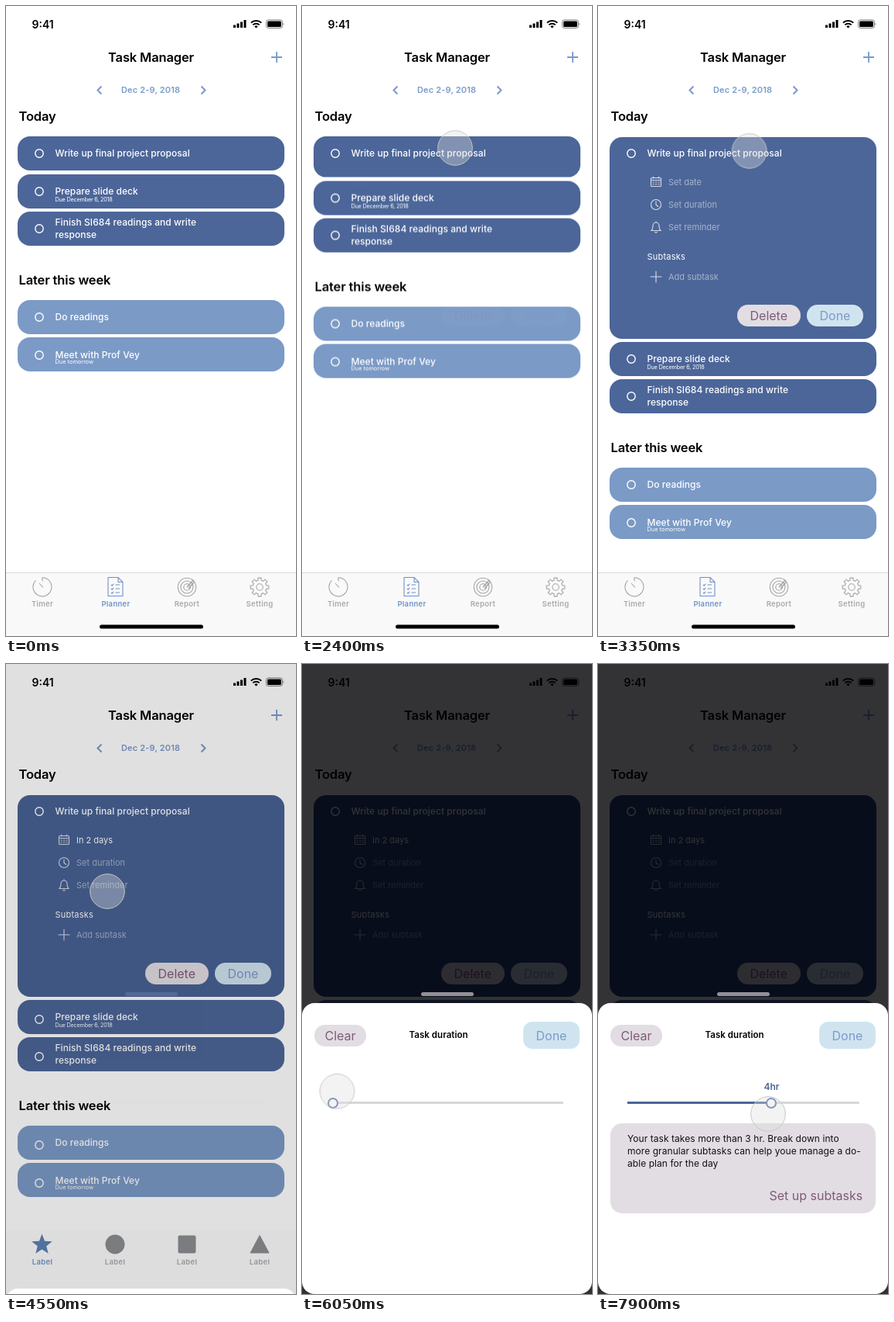
Animation of 375x812 px, one loop 8 s. Source, as an HTML page:

```html
<!DOCTYPE html>
<html lang="en">
<head>
<meta charset="utf-8">
<title>Task planner</title>
<style>
html, body { margin: 0; width: 100%; height: 100%; overflow: hidden; background: #fff; }
svg { display: block; width: 375px; height: 812px; }
text { font: 500 12px Inter, "Liberation Sans", sans-serif; fill: #fff; }
.line { fill: none; stroke: #fff; stroke-width: 1.1; stroke-linecap: round; stroke-linejoin: round; }
.title { font-size: 16.5px; font-weight: 600; letter-spacing: -.14px; fill: #000; }
.title.small { font-size: 11.5px; letter-spacing: .05px; }
.clock { font-size: 14px; font-weight: 600; fill: #000; }
.week { font-size: 11px; font-weight: 600; letter-spacing: .15px; fill: #7b9acb; }
.task { letter-spacing: .05px; }
.due { font-size: 7.3px; font-weight: 400; letter-spacing: -.23px; }
.due.loose { letter-spacing: .05px; }
.field { font-size: 11px; font-weight: 400; }
.field.wide { letter-spacing: .22px; }
.dim { fill: rgba(255, 255, 255, .5); }
.button { font-size: 16px; font-weight: 400; }
.tabs text { font-size: 9.5px; font-weight: 600; letter-spacing: .3px; fill: #a9a9ad; text-anchor: middle; }
.tabs .on { fill: #6f92cb; }
.dark { fill: #4c6699; }
.light { fill: #7b9ac6; }
.ring { fill: none; stroke: #fff; stroke-width: 1.4; }
.pink { fill: #e2dde3; }
.sky { fill: #d0e4f0; }
.plum { fill: #7f5b78; }
.blue { fill: #7d9acb; }
.body { font-weight: 400; letter-spacing: .06px; fill: #111; }
.value { font-weight: 600; fill: #4c6699; text-anchor: middle; }

.grow, .push, .detail, .before, .after, .drop, .fade, .sheet, .knob, .fill, .reveal, .touch, .touch g {
  animation: 8s linear infinite;
}
.grow { animation-name: grow, darken; }
.push { animation-name: push; }
.detail { animation-name: detail; }
.before { animation-name: before; animation-timing-function: step-end; }
.after { animation-name: after; animation-timing-function: step-end; }
.drop { animation-name: drop; animation-timing-function: step-end; }
.fade { animation-name: fade; }
.sheet { animation-name: sheet; }
.knob { animation-name: knob; }
.fill { animation-name: fill; transform-origin: 38px 0; }
.reveal { animation-name: reveal; }
.touch { animation-name: travel; }
.touch g { animation-name: touch; }

/* the first card opens, 2345 to 2745 ms */
@keyframes grow {
  0%, 29.31% { y: 168px; height: 44px; animation-timing-function: ease-in-out; }
  34.31%, 100% { y: 169px; height: 260px; }
}
@keyframes push {
  0%, 29.31% { transform: translateY(0); animation-timing-function: ease-in-out; }
  34.31%, 100% { transform: translateY(216px); }
}
@keyframes detail {
  0%, 29.31% { opacity: 0; animation-timing-function: ease-in-out; }
  34.31%, 100% { opacity: 1; }
}
/* hard switch to the second screen, 4500 ms */
@keyframes before { 0% { opacity: 1; } 56.25%, 100% { opacity: 0; } }
@keyframes after { 0% { opacity: 0; } 56.25%, 100% { opacity: 1; } }
@keyframes drop { 0% { transform: translateY(0); } 56.25%, 100% { transform: translateY(3px); } }
/* the sheet comes up over a darkening page */
@keyframes fade {
  0%, 56.2% { opacity: 0; }
  56.875% { opacity: .15; }
  59.375% { opacity: .94; }
  62.5%, 100% { opacity: 1; }
}
@keyframes darken {
  0%, 56.2% { fill: #4c6699; }
  62.5%, 100% { fill: #274378; }
}
@keyframes sheet {
  0%, 56.55% { transform: translateY(375px); animation-timing-function: ease-in-out; }
  59.95%, 100% { transform: translateY(0); }
}
/* the slider is dragged, then settles */
@keyframes knob {
  0%, 84.375% { transform: translateX(0); animation-timing-function: ease; }
  95% { transform: translateX(177px); animation-timing-function: ease-out; }
  98.75%, 100% { transform: translateX(184px); }
}
@keyframes fill {
  0%, 84.375% { transform: scaleX(0); animation-timing-function: ease; }
  95% { transform: scaleX(.962); animation-timing-function: ease-out; }
  98.75%, 100% { transform: scaleX(1); }
}
@keyframes reveal {
  0%, 84.375% { opacity: 0; animation-timing-function: ease; }
  95% { opacity: .962; animation-timing-function: ease-out; }
  98.75%, 100% { opacity: 1; }
}
@keyframes travel {
  0%, 17.5% { transform: translate(230px, 520px); animation-timing-function: ease; }
  26.875%, 41.5% { transform: translate(198px, 183px); animation-timing-function: ease; }
  49%, 68.4% { transform: translate(131px, 293px); animation-timing-function: ease; }
  78.75%, 84.375% { transform: translate(40px, 567px); animation-timing-function: ease; }
  95%, 100% { transform: translate(220px, 580px); }
}
@keyframes touch { 0%, 10.9% { opacity: 0; } 15%, 100% { opacity: 1; } }
</style>
</head>
<body>
<svg viewBox="0 0 375 812">
  <rect width="375" height="812" fill="#fff"/>

  <!-- status bar -->
  <text class="clock" x="33.5" y="28.5">9:41</text>
  <path d="M294 24.5h3v3.5h-3zM298.5 22.5h3v5.5h-3zM303 20.5h3v7.5h-3zM307.5 18h3v10h-3z"/>
  <g fill="none" stroke="#000" stroke-width="2">
    <path d="M316.8 21.6a9.6 9.6 0 0 1 13.4 0M319.3 24.4a6 6 0 0 1 8.4 0"/>
    <rect x="336.5" y="18" width="21" height="10.4" rx="2.8" stroke-width="1" stroke="#777"/>
  </g>
  <path d="M321.3 26.4a3.2 3.2 0 0 1 4.4 0l-2.2 2.2z"/>
  <rect x="338" y="19.5" width="18" height="7.4" rx="1.5"/>
  <path d="M358.6 21.4q1.8 1.8 0 3.6z" fill="#777"/>

  <!-- header -->
  <text class="title" x="132" y="72">Task Manager</text>
  <path d="M343 66h14M350 59v14" stroke="#7b9acb" stroke-width="1.8"/>
  <path d="M123.5 103.5l-5 5 5 5M252.5 103.5l5 5-5 5" fill="none" stroke="#7b9acb" stroke-width="2"/>
  <text class="week" x="149" y="112">Dec 2-9, 2018</text>
  <text class="title" x="16.5" y="148">Today</text>

  <!-- first card -->
  <rect class="dark grow" x="15" y="168" width="345" height="44" rx="16"/>
  <circle class="ring" cx="43" cy="190" r="5.2"/>
  <text class="task" x="63.5" y="194">Write up final project proposal</text>

  <!-- other cards -->
  <g class="push">
    <rect class="dark" x="15" y="217" width="345" height="44" rx="16"/>
    <rect class="dark" x="15" y="265" width="345" height="44" rx="16"/>
    <rect class="light" x="15" y="379" width="345" height="44" rx="16"/>
    <rect class="light" x="15" y="427" width="345" height="44" rx="16"/>
    <g class="ring drop">
      <circle cx="43" cy="239" r="5.2"/>
      <circle cx="43" cy="287" r="5.2"/>
      <circle cx="43" cy="401" r="5.2"/>
      <circle cx="43" cy="450" r="5.2"/>
    </g>
    <text class="task" x="63.5" y="243">Prepare slide deck</text>
    <text class="due" x="63.5" y="252">Due December 6, 2018</text>
    <text class="task" x="63.5" y="283">Finish SI684 readings and write</text>
    <text class="task" x="63.5" y="299">response</text>
    <text class="title" x="16.5" y="359">Later this week</text>
    <text class="task" x="63.5" y="405">Do readings</text>
    <text class="task" x="63.5" y="453.5">Meet with Prof Vey</text>
    <text class="due loose" x="63.5" y="461">Due tomorrow</text>
  </g>

  <!-- details of the open card -->
  <g class="detail">
    <g class="line" opacity=".78">
      <rect x="68.5" y="221.5" width="13" height="11" rx="1"/>
      <path d="M68.5 224.5h13M71.5 220v2M78.5 220v2"/>
      <path d="M71 227h8.5M71 229.8h8.5" stroke-dasharray="1.2 2.3"/>
      <circle cx="75" cy="256" r="6.5"/>
      <path d="M75 251.8v4.4l2.8 2.3"/>
      <path d="M68.8 289.5h12.4q-2.2-1.8-2.2-6.5a4 4 0 0 0-8 0q0 4.700-2.2 6.5zM75 278.8v-1M73.6 291.3q1.4 1.5 2.8 0"/>
      <path d="M68 349h14M75 342v14"/>
    </g>
    <text class="field dim before" x="91" y="231">Set date</text>
    <text class="field after" x="91" y="231">In 2 days</text>
    <text class="field dim" x="91" y="259.5">Set duration</text>
    <text class="field dim" x="91" y="288.5">Set reminder</text>
    <text class="field wide" x="63.5" y="327">Subtasks</text>
    <text class="field dim" x="91" y="352.5">Add subtask</text>
    <rect class="pink" x="180" y="385" width="82" height="28" rx="14"/>
    <text class="button plum" x="196.5" y="405">Delete</text>
    <rect class="sky" x="270" y="385" width="73" height="28" rx="14"/>
    <text class="button blue" x="286.5" y="405">Done</text>
  </g>

  <!-- tab bar -->
  <g class="tabs before">
    <rect y="730" width="375" height="82" fill="#f9f9f9"/>
    <path d="M0 730.5h375" stroke="#dcdcde"/>
    <g fill="none" stroke="#a4a4a8" stroke-width="1.1">
      <path d="M47 736.8v4.5M47 736.8a12 12 0 1 1-8.5 3.5M43 744l5 5.5"/>
      <path d="M132 736.5h13l6 6v18h-19zM145 736.5v6h6M136 746l1.2 1.2 2-2.4M136 751l1.2 1.2 2-2.4M136 756l1.2 1.2 2-2.4M141.5 746h5.5M141.5 751h5.5M141.5 756h5.5" stroke="#6f92cb"/>
      <circle cx="234" cy="749" r="11.7"/>
      <circle cx="234" cy="749" r="8"/>
      <circle cx="234" cy="749" r="4.2"/>
      <path d="M234 749l8.5-9.5M236 751l7.5-9" stroke-width="1.5"/>
      <path id="gear"/>
      <circle cx="328" cy="749" r="4.2"/>
    </g>
    <text x="47" y="774">Timer</text>
    <text class="on" x="142" y="774">Planner</text>
    <text x="234" y="774">Report</text>
    <text x="328" y="774">Setting</text>
    <rect x="121" y="797.5" width="134" height="5" rx="2.5"/>
  </g>
  <g class="tabs after">
    <rect y="730" width="375" height="82" fill="#fcfcfc"/>
    <path id="star" fill="#6080b4"/>
    <g fill="#8c8d92">
      <circle cx="141" cy="748" r="12.5"/>
      <rect x="222.5" y="736.5" width="23" height="23" rx="2"/>
      <path d="M328 736.5l12 22.5h-24z" stroke="#8c8d92" stroke-linejoin="round"/>
    </g>
    <text class="on" x="47" y="774">Label</text>
    <text x="141" y="774">Label</text>
    <text x="234" y="774">Label</text>
    <text x="328" y="774">Label</text>
  </g>

  <g class="fade">
    <rect width="375" height="812" fill="#000004" fill-opacity=".8"/>
    <rect x="154" y="423" width="68" height="5" rx="2.5" fill="#929096"/>
  </g>

  <!-- duration sheet -->
  <g class="sheet">
    <rect y="437" width="375" height="375" rx="16" fill="#fff"/>
    <rect class="pink" x="16" y="465" width="67" height="28" rx="14"/>
    <text class="button plum" x="29.5" y="485">Clear</text>
    <text class="title small" x="138.5" y="482">Task duration</text>
    <rect class="sky" x="286" y="461" width="73" height="35" rx="12"/>
    <text class="button blue" x="302.5" y="484.5">Done</text>
    <rect x="38" y="564" width="300" height="3" rx="1.5" fill="#d7d7db"/>
  </g>
  <g class="fade">
    <rect x="38" y="564" width="300" height="3" rx="1.5" fill="#d7d7db"/>
    <rect class="dark" x="38" y="564" width="1.2" height="3"/>
  </g>
  <g class="reveal">
    <rect class="pink" x="16" y="592" width="343" height="116" rx="15"/>
    <text class="body" x="38" y="616">Your task takes more than 3 hr. Break down into</text>
    <text class="body" x="38" y="632">more granular subtasks can help youe manage a do-</text>
    <text class="body" x="38" y="648">able plan for the day</text>
    <text class="button plum" x="221.5" y="691">Set up subtasks</text>
  </g>
  <rect class="dark fill" x="38" y="564" width="186" height="3"/>
  <g class="sheet">
    <g class="knob">
      <circle cx="40" cy="566" r="6" fill="#fff" stroke="#5470a8" stroke-width="2"/>
      <g class="reveal"><text class="value" x="40.5" y="549">4hr</text></g>
    </g>
  </g>

  <g class="touch">
    <g><circle r="22.3" fill="#dedede" fill-opacity=".37" stroke="#c6c6c6"/></g>
  </g>
</svg>
<script>
// closed outline from polar points [angle, radius]
function outline(cx, cy, points) {
  return 'M' + points.map(([a, r]) =>
    (cx + r * Math.sin(a)).toFixed(2) + ' ' + (cy - r * Math.cos(a)).toFixed(2)).join('L') + 'z';
}
const teeth = [], tips = [];
for (let i = 0; i < 8; i++) {
  const a = i * Math.PI / 4;
  teeth.push([a - .24, 9], [a - .17, 12], [a + .17, 12], [a + .24, 9]);
}
for (let i = 0; i < 10; i++) tips.push([i * Math.PI / 5, i % 2 ? 6 : 14]);
document.getElementById('gear').setAttribute('d', outline(328, 749, teeth));
document.getElementById('star').setAttribute('d', outline(46.5, 748.5, tips));
</script>
</body>
</html>
```
